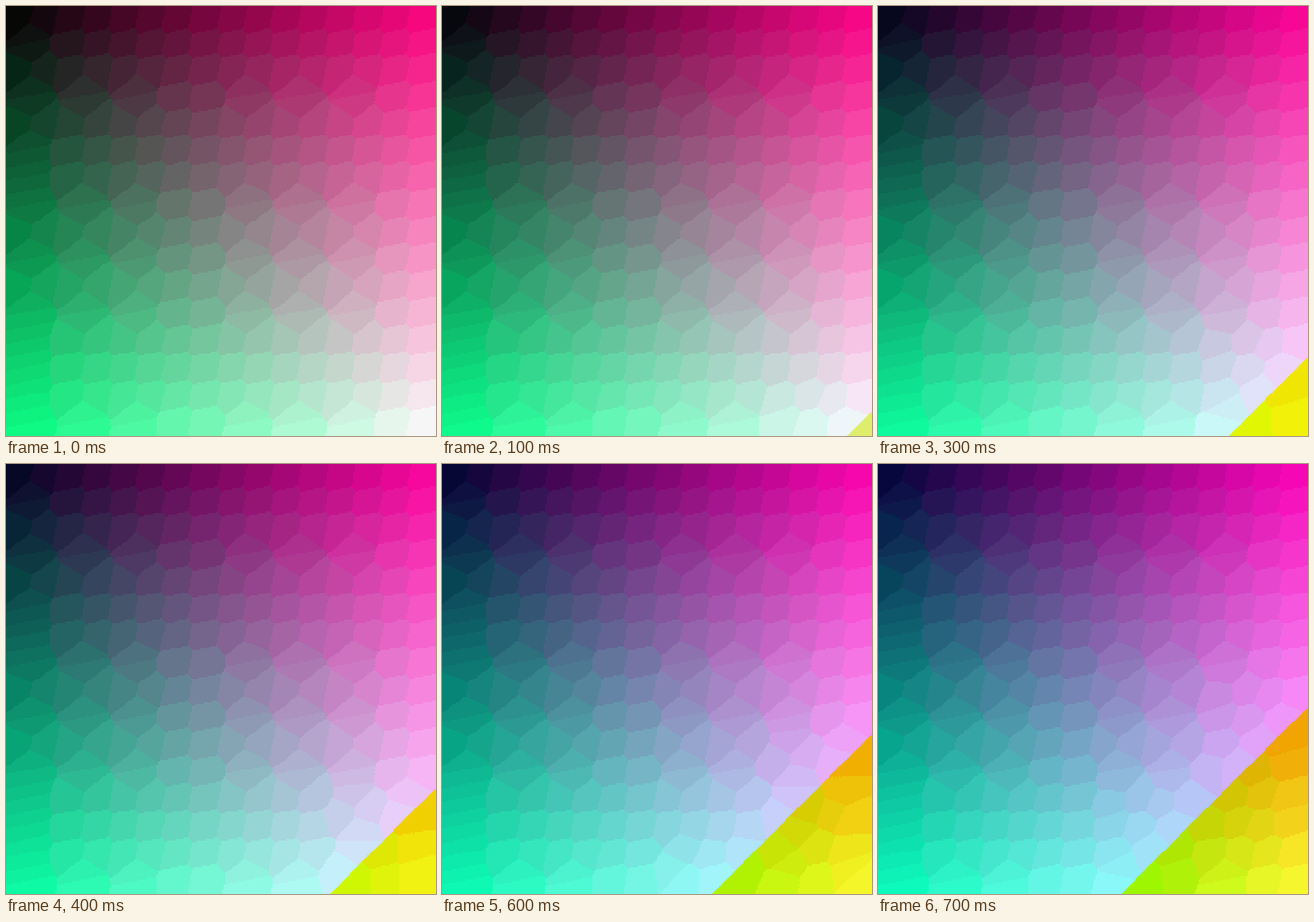
An HTML page with a canvas for the animation above (0.8 s loop, 500 by 500 pixels).

```html
<!DOCTYPE html>
<html lang="en">
<head>
<meta charset="utf-8">
<title>Colour cube slice</title>
<style>
  html, body { margin: 0; width: 100%; height: 100%; overflow: hidden; background: #000; }
  canvas { display: block; width: 500px; height: 500px; }
</style>
</head>
<body>
<canvas id="stage" width="500" height="500"></canvas>
<script>
const SIZE = 500, LEVELS = 255, STEPS = 8, STEP_MS = 100, COLOURS = 256;
const WEIGHTS = [77, 150, 29]; // luma weights choose the axis to cut
const ctx = document.getElementById('stage').getContext('2d');

// Pixel position -> channel level, and how many pixels share each level
const level = Array.from({ length: SIZE }, (_, x) => Math.floor(x * LEVELS / SIZE));
const width = new Array(LEVELS).fill(0);
level.forEach(v => width[v]++);

const CELLS = LEVELS * LEVELS;
const red = new Uint8Array(CELLS), green = new Uint8Array(CELLS), count = new Uint8Array(CELLS);
for (let i = 0; i < CELLS; i++) {
  red[i] = i % LEVELS;
  green[i] = Math.floor(i / LEVELS);
  count[i] = width[red[i]] * width[green[i]];
}

// Red runs across, green down, blue is their mean and climbs with each step
function blueAt(step) {
  return Uint8Array.from(red, (r, i) => (((r + green[i]) >> 1) + 8 * step) % LEVELS);
}

class Heap {
  constructor() { this.a = [null]; }
  add(box) {
    const a = this.a;
    let k = a.length;
    a.push(box);
    while (k > 1 && box.total > a[k >> 1].total) {
      a[k] = a[k >> 1];
      k >>= 1;
    }
    a[k] = box;
  }
  take() {
    const a = this.a, top = a[1], last = a.pop(), n = a.length - 1;
    if (!n) return top;
    let k = 1;
    while (k * 2 <= n) {
      let l = k * 2;
      if (l < n && a[l].total < a[l + 1].total) l++;
      if (last.total > a[l].total) break;
      a[k] = a[l];
      k = l;
    }
    a[k] = last;
    return top;
  }
}

function makeBox(cells) {
  let total = 0;
  for (const i of cells) total += count[i];
  return { cells, total };
}

// Cut a box at the median of its widest weighted axis
function cut(box, channels) {
  let axis = 0, best = -1, low = 0, high = 0;
  channels.forEach((ch, n) => {
    let lo = 255, hi = 0;
    for (const i of box.cells) {
      if (ch[i] < lo) lo = ch[i];
      if (ch[i] > hi) hi = ch[i];
    }
    const span = (hi - lo) * WEIGHTS[n];
    if (span > best) { best = span; axis = n; low = lo; high = hi; }
  });

  const ch = channels[axis], histogram = new Uint32Array(256);
  for (const i of box.cells) histogram[ch[i]] += count[i];
  let edge = high, sum = histogram[high];
  while (sum * 2 <= box.total) sum += histogram[--edge];
  if (edge <= low) edge = low + 1;

  return [
    makeBox(box.cells.filter(i => ch[i] >= edge)),
    makeBox(box.cells.filter(i => ch[i] < edge))
  ];
}

function makePalette(channels) {
  const heap = new Heap();
  heap.add(makeBox(Uint32Array.from(red, (_, i) => i)));
  for (let n = 1; n < COLOURS; n++) cut(heap.take(), channels).forEach(b => heap.add(b));
  return heap.a.slice(1).map(box => channels.map(ch => {
    let sum = 0;
    for (const i of box.cells) sum += ch[i] * count[i];
    return Math.floor(0.5 + sum / box.total);
  }));
}

function nearest(palette, r, g, b) {
  let best = Infinity, pick = 0;
  for (let n = 0; n < palette.length; n++) {
    const p = palette[n], dg = p[1] - g;
    let d = dg * dg;
    if (d >= best) continue;
    const dr = p[0] - r, db = p[2] - b;
    d += dr * dr + db * db;
    if (d < best) { best = d; pick = n; }
  }
  return palette[pick];
}

function render(step) {
  const blue = blueAt(step);
  const palette = makePalette([red, green, blue]);
  const colour = Array.from(red, (r, i) => nearest(palette, r, green[i], blue[i]));
  const image = ctx.createImageData(SIZE, SIZE), px = image.data;
  for (let y = 0, o = 0; y < SIZE; y++) {
    for (let x = 0; x < SIZE; x++, o += 4) {
      const c = colour[level[y] * LEVELS + level[x]];
      px[o] = c[0];
      px[o + 1] = c[1];
      px[o + 2] = c[2];
      px[o + 3] = 255;
    }
  }
  return image;
}

const cache = [];
let shown = -1;

function draw(now) {
  const step = Math.floor(now / STEP_MS) % STEPS;
  if (step !== shown) {
    cache[step] = cache[step] || render(step);
    ctx.putImageData(cache[step], 0, 0);
    shown = step;
  }
}

function tick(now) {
  draw(now - start);
  requestAnimationFrame(tick);
}

for (let s = 0; s < STEPS; s++) cache[s] = render(s);
let start = 0;
draw(0);
requestAnimationFrame(tick);
</script>
</body>
</html>
```
